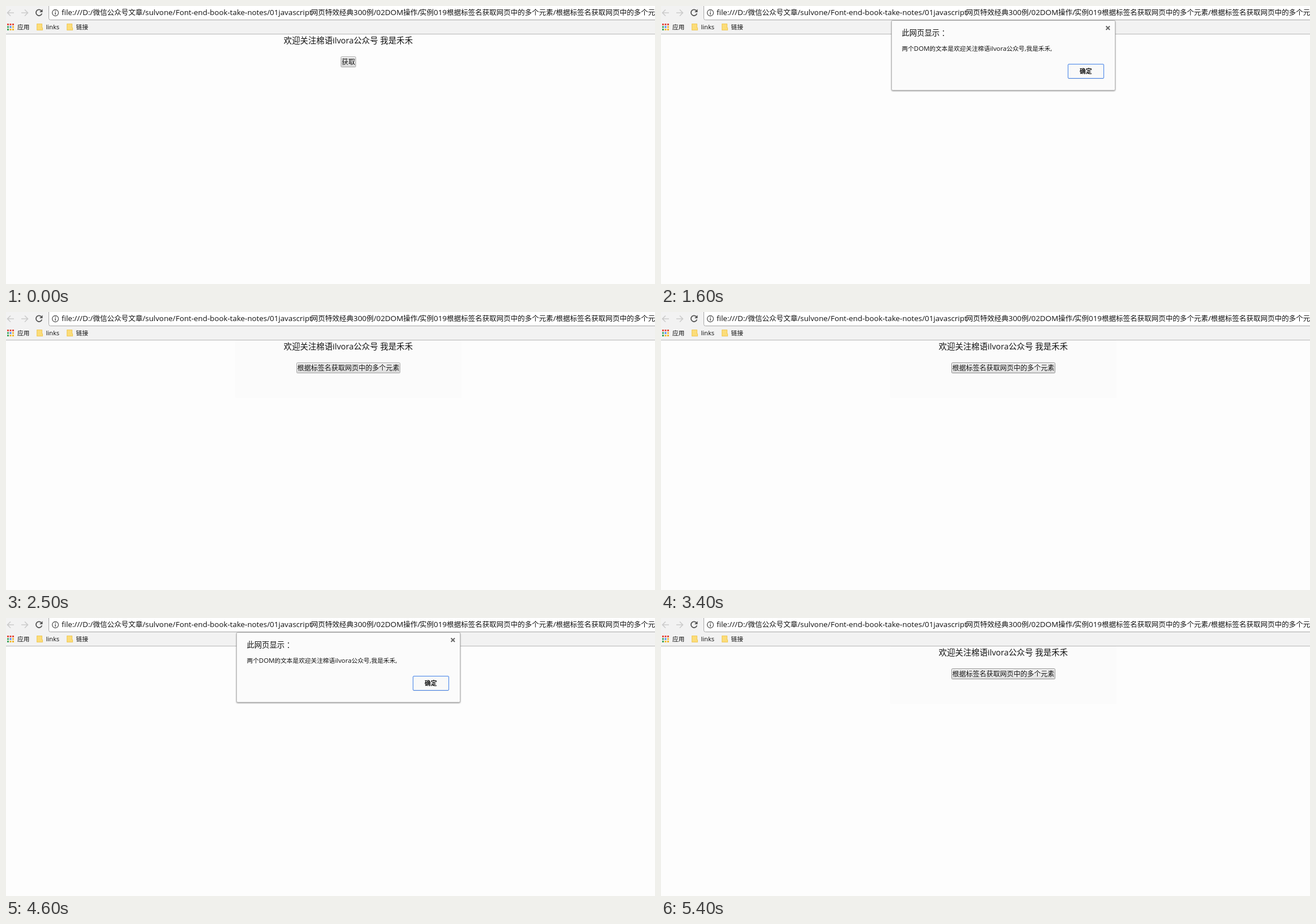
These frames come from a looping animation (1144 px wide and 490 px high, 6100 ms). An HTML page:

```html
<!DOCTYPE html>
<html lang="zh-CN">
<head>
<meta charset="utf-8">
<title>Alert demo</title>
<style>
html, body { margin: 0; width: 100%; height: 100%; overflow: hidden; background: #fdfdfd; }
svg { display: block; width: 1144px; height: 490px; }
text { font-family: "Open Sans", "Noto Sans CJK SC", "Noto Sans CJK", sans-serif; fill: #111; white-space: pre; }
#dialog .card { fill: #fbfbfb; stroke: #b4b4b4; filter: drop-shadow(0 1px 1px rgba(0,0,0,.4)); }
</style>
</head>
<body>
<svg viewBox="0 0 1144 490">
  <defs>
    <linearGradient id="idle" x2="0" y2="1"><stop stop-color="#f4f4f4"/><stop offset="1" stop-color="#dcdcdc"/></linearGradient>
    <linearGradient id="hover" x2="0" y2="1"><stop stop-color="#f7f7f7"/><stop offset="1" stop-color="#e1e1e1"/></linearGradient>
    <linearGradient id="press" x2="0" y2="1"><stop stop-color="#e3e3e3"/><stop offset="1" stop-color="#eaeaea"/></linearGradient>
  </defs>

  <rect id="veil" x="404" y="50" width="399" height="102" rx="3" fill="#fbfbfb"/>
  <g id="page"></g>
  <rect id="btn" y="89.5" height="18" rx="1"/>
  <g id="short"></g>
  <g id="long"></g>

  <rect width="1144" height="50" fill="#f2f2f2"/>
  <path d="M0 49.5H1144" stroke="#b6b6b6"/>
  <path d="M75.5-5V21.5Q75.5 24.5 78.5 24.5H1150V-5Z" fill="#fff" stroke="#a6a6a6"/>
  <g fill="none" stroke-width="1.6">
    <path d="M14 12H3M8 6.5L2.5 12L8 17.5M27 12H38M33 6.5L38.5 12L33 17.5" stroke="#cbcbcb"/>
    <path d="M62.5 8.5A5.3 5.3 0 1 0 63.3 13.3" stroke="#555" stroke-width="1.8"/>
    <path d="M64.5 5.5V11H59Z" fill="#555"/>
    <circle cx="87" cy="12" r="5.5" stroke="#555" stroke-width="1.3"/>
    <path d="M87 11V15.2M87 8.5V10" stroke="#555" stroke-width="1.5"/>
  </g>
  <g id="bar"></g>

  <g id="dialog">
    <rect class="card" x="406.5" y="25.5" width="394" height="123" rx="2"/>
    <path d="M784.5 35.5L791 42M791 35.5L784.5 42" stroke="#636363" stroke-width="1.9"/>
    <rect id="ok" x="717.5" y="102.5" width="63" height="25" rx="1.5"/>
    <g id="words"></g>
  </g>
</svg>
<script>
const $ = id => document.getElementById(id);

// Latin and Chinese runs take their own sizes.
function label(x, y, str, latin, cjk, attrs = '') {
  const runs = str.replace(/[\u3000-\u9fff\uff00-\uffef]+/g, s => `<tspan font-size="${cjk}">${s}</tspan>`);
  return `<text x="${x}" y="${y}" font-size="${latin}" ${attrs}>${runs}</text>`;
}

const url = [
  [98, 'file:///D:/微信公众号文章/sulvone/'],
  [299, 'Font-end-book-take-notes/01javascript'],
  [537.5, '网页特效经典300例/02DOM操作/'],
  [729, '实例019根据标签名获取网页中的多个元素/根据标签名获取网页中的多个元素']
];
const dots = ['#e5483b', '#e5483b', '#e5483b', '#3da55c', '#4285f4', '#f2b92d', '#3da55c', '#f2b92d', '#f2b92d'];
const folder = x => `<path d="M${x} 31h9q1 0 1 1v6h1v5h-11z" fill="#fbdc79"/>
  <path d="M${x + .5} 31.5h9v7h1v4h-10z" fill="none" stroke="#efc95c"/>`;

$('bar').innerHTML = url.map(([x, s]) => label(x, 16, s, 13.33, 12.5)).join('')
  + dots.map((c, i) => `<rect x="${2 + i % 3 * 4.5}" y="${31 + (i / 3 | 0) * 4.5}" width="3" height="3" fill="${c}"/>`).join('')
  + folder(54) + folder(107)
  + label(20, 41, '应用', 11, 10.7) + label(70.5, 41, 'links', 11.1, 11) + label(123.5, 41, '链接', 11, 10.7);

$('page').innerHTML = label(489.5, 66, '欢迎关注棉语ilvora公众号 我是禾禾', 14.4, 14.4);
$('short').innerHTML = label(591.5, 103, '获取', 12, 12);
$('long').innerHTML = label(513.5, 103, '根据标签名获取网页中的多个元素', 12, 12);
$('words').innerHTML = label(424.5, 51.5, '此网页显示', 13.3, 13.3) + label(494.5, 51.5, '：', 13.3, 13.3)
  + label(424.5, 79, '两个DOM的文本是欢迎关注棉语ilvora公众号,我是禾禾,', 11.4, 10.67)
  + label(738, 119, '确定', 10.8, 10.8, 'font-weight="700"');

const borders = { idle: '#a4a4a4', hover: '#8c8c8c', press: '#868686' };
const okLook = {
  idle: { fill: '#fbfbfb', stroke: '#4d8af0', style: '' },
  hover: { fill: '#f9f9f9', stroke: '#3f7fe8', style: 'filter:drop-shadow(0 1px 0 rgba(0,0,0,.08))' },
  press: { fill: '#e5e5e5', stroke: '#6c9df0', style: '' }
};

// start time, page button, dialog opacity, dialog shift, confirm button
const steps = [
  [0, 'idle', 0, 0, 'idle'],
  [700, 'press', 0, 0, 'idle'],
  [900, 'press', .03, -13, 'idle'],
  [1000, 'press', .15, -13, 'idle'],
  [1100, 'press', .97, -3, 'idle'],
  [1200, 'press', 1, 0, 'idle'],
  [1600, 'press', 1, 0, 'hover'],
  [2100, 'press', 1, 0, 'press'],
  [2300, 'press', .97, -2, 'press'],
  [2400, 'idle', .15, -13, 'press'],
  [2500, 'idle', 0, 0, 'idle'],
  [3400, 'hover', 0, 0, 'idle'],
  [3900, 'press', 0, 0, 'idle'],
  [4100, 'press', .03, -13, 'idle'],
  [4200, 'press', .15, -13, 'idle'],
  [4300, 'press', .97, -3, 'idle'],
  [4400, 'press', 1, 0, 'idle'],
  [4600, 'press', 1, 0, 'hover'],
  [5100, 'press', 1, 0, 'press'],
  [5200, 'press', .97, -2, 'press'],
  [5300, 'hover', .15, -14, 'press'],
  [5400, 'hover', 0, 0, 'idle']
];

function set(id, attrs) {
  for (const k in attrs) $(id).setAttribute(k, attrs[k]);
}

function draw(now) {
  const t = now % 6100;
  const [, btn, alpha, dy, ok] = steps.findLast(s => s[0] <= t);
  const wide = t >= 2400;
  set('btn', { x: wide ? 512.5 : 590.5, width: wide ? 182 : 26, fill: `url(#${btn})`, stroke: borders[btn] });
  set('short', { opacity: wide ? 0 : 1 });
  set('long', { opacity: wide ? 1 : 0 });
  set('veil', { opacity: t >= 2500 ? 1 : 0 });
  set('dialog', { opacity: alpha, transform: `translate(0 ${dy})` });
  set('ok', okLook[ok]);
  requestAnimationFrame(draw);
}
draw(performance.now());
</script>
</body>
</html>
```
